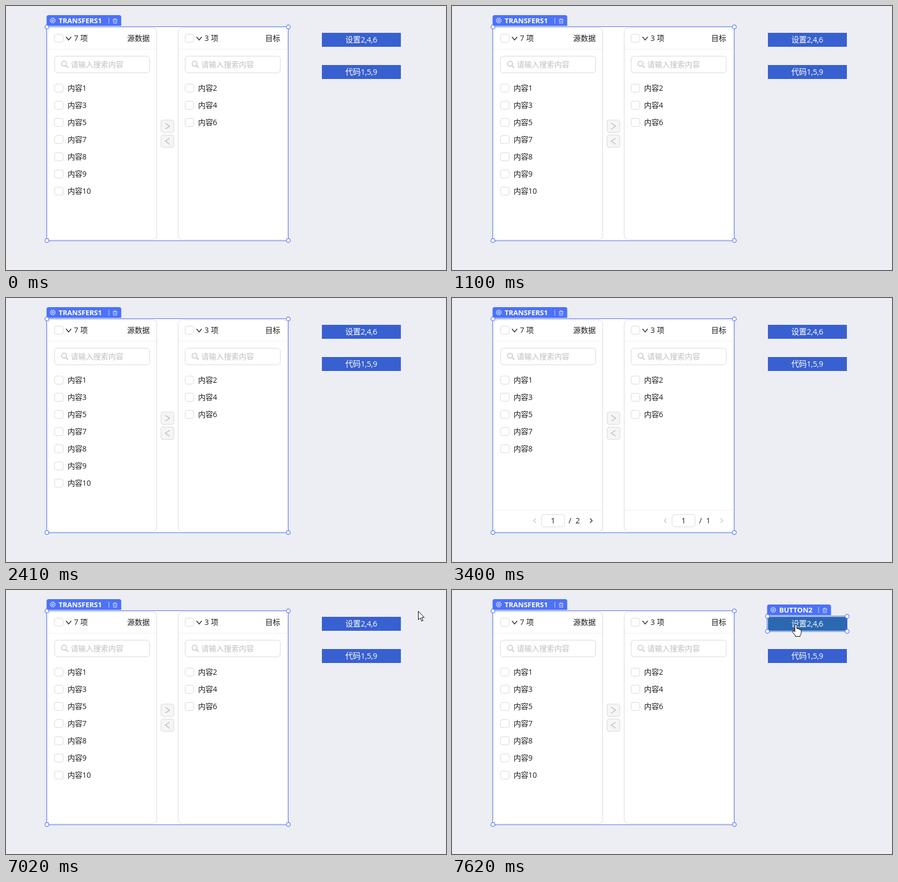
An HTML page that plays this animation: 819x492 px, repeating every 8 s.

```html
<!DOCTYPE html>
<html lang="zh">
<head>
<meta charset="utf-8">
<style>
html, body { margin: 0; width: 100%; height: 100%; overflow: hidden; background: #edeef4; }
svg { display: block; font: 14px "Open Sans", "Noto Sans CJK SC", "Noto Sans CJK", sans-serif; }
</style>
</head>
<body>
<svg id="stage" width="819" height="492" viewBox="0 0 819 492"></svg>
<script>
const stage = document.getElementById('stage');
const BLUE = '#4c72fa', BORDER = '#d9d9d9', INK = '#1f1f1f', MUTED = '#bfbfbf';
const SHIFT = 243; // distance between the two panels

const rect = (x, y, w, h, fill, stroke = 'none', r = 0) =>
  `<rect x="${x}" y="${y}" width="${w}" height="${h}" rx="${r}" fill="${fill}" stroke="${stroke}"/>`;
const line = (d, color, width = 1) =>
  `<path d="${d}" fill="none" stroke="${color}" stroke-width="${width}"/>`;
const circle = (x, y, r, fill, stroke, width = 1) =>
  `<circle cx="${x}" cy="${y}" r="${r}" fill="${fill}" stroke="${stroke}" stroke-width="${width}"/>`;
const text = (x, y, s, fill = INK, attrs = '') =>
  `<text x="${x}" y="${y}" fill="${fill}" ${attrs}>${s}</text>`;
const checkbox = (x, cy) => rect(x + .5, cy - 7.5, 16, 15, '#fff', BORDER, 3.5);

const trash = (x, y, color, scale = 1) => `<g transform="translate(${x} ${y}) scale(${scale})">` +
  line('M-5 -3H5M-2 -3V-5H2V-3M-4 -3L-3.5 5H3.5L4 -3M-1.3 -.5V3M1.3 -.5V3', color) + '</g>';

function gear(x, y) {
  let d = '';
  for (let i = 0; i <= 24; i++) {
    const a = i * Math.PI / 12, r = i % 3 ? 4.7 : 3.8;
    d += `${i ? 'L' : 'M'}${x + r * Math.cos(a)} ${y + r * Math.sin(a)}`;
  }
  return line(d + 'Z', '#fff') + circle(x, y, 1.7, 'none', '#fff');
}

// Selection outline with its name tag
function selection(x, y, w, h, name, tagWidth) {
  const top = y - 22, right = x + tagWidth;
  let s = rect(x - .5, y - .5, w, h + 1, 'none', BLUE);
  s += `<path d="M${x - .5} ${top + 20}V${top + 4}q0 -4 4 -4H${right - 3.5}q4 0 4 4V${top + 20}Z" fill="${BLUE}"/>`;
  s += gear(x + 11, top + 10) + text(x + 22, top + 14.7, name, '#fff', 'font-size="13" font-weight="700"');
  s += line(`M${right - 22.5} ${top + 5}v11`, '#a9bcfd', 1.4) + trash(right - 11, top + 11, '#e4eaff', .85);
  for (const cx of [x + .2, x + w - .5])
    for (const cy of [y, y + h]) s += circle(cx, cy, 3.7, '#fff', BLUE, 1.2);
  return s;
}

function pager(right, pages) {
  const y = 415, next = pages > 1 ? INK : MUTED;
  return line(`M${right - 193} 395.5H${right + 9}`, '#f0f0f0') +
    line(`M${right - 115} ${y - 4}l-4 4l4 4`, MUTED, 1.2) +
    rect(right - 104.5, y - 11.5, 43, 23, '#fff', BORDER, 5.5) +
    text(right - 83, y + 5, '1', INK, 'text-anchor="middle"') +
    text(right - 54, y + 5, '/') + text(right - 41, y + 5, pages) +
    line(`M${right - 14} ${y - 4}l4 4l-4 4`, next, 1.2);
}

function panel(dx, title, items, ui, removable) {
  const left = 90 + dx, back = removable ? 20 : 0;
  let s = rect(77.5 + dx, 40.5, 203, 395, '#fff', BORDER, 8);
  s += line(`M${78 + dx} 80.5h202`, '#f0f0f0');
  if (!removable) s += checkbox(left, 60);
  s += line(`M${left + 21.7 - back} 57.5l4.8 6l4.8 -6`, INK, 1.3);
  s += text(left + 36.5 - back, 65, items.length + ' 项');
  s += text(left + 177.5, 65, title, INK, 'text-anchor="end"');
  if (ui.search) {
    s += rect(left + .5, 93.5, 177, 31, '#fff', BORDER, 5.5);
    s += circle(left + 18, 107.5, 4.6, 'none', '#b5b5b5', 1.2) + line(`M${left + 21.5} 111l4.3 4.3`, '#b5b5b5', 1.3);
    s += text(left + 30.5, 114, '请输入搜索内容', MUTED);
  }
  const shown = ui.paged ? items.slice(0, 5) : items;
  shown.forEach((n, i) => {
    const cy = (ui.search ? 153 : 97) + i * 32;
    s += removable ? trash(left + 170, cy, BORDER, 1.15) : checkbox(left, cy);
    s += text(left + (removable ? 0 : 24.5), cy + 5, '内容' + n, INK, 'letter-spacing="-.2"');
  });
  if (ui.paged) s += pager(271 + dx, Math.ceil(items.length / 5));
  return s;
}

const moveButton = (y, d) => rect(288.5, y + .5, 24, 23, '#f5f5f5', BORDER, 3.5) +
  line(`M${300.5 - 4 * d} ${y + 6.5}l${8 * d} 5.5l${-8 * d} 5.5`, '#b3b3b3', 1.2);

const button = (y, label, fill) => rect(588, y, 147, 26, fill) +
  text(661.2, y + 18, label, '#fff', 'font-size="14.6" letter-spacing="-.3" text-anchor="middle"');

const ARROW = 'M.5 .5V16.5L4.2 13L6.7 19L9.2 18L6.7 12.2H11.5Z';
const HAND = 'M-1.8 14V2Q-1.8 .4 0 .4T1.8 2V8Q4.6 7 5 9Q7.4 8 7.8 10Q10 9.3 10 11.5V16' +
  'Q10 19 8 20.5V22.5H-1V20.5L-6 14.5Q-6.5 11.8 -3.8 12.3Z';

function draw(ui) {
  const hover = ui.pointer && ui.pointer.x < 734 && ui.pointer.y > 50;
  let s = rect(0, 0, 819, 492, '#edeef4') + rect(76, 39, 450, 398, '#fff');
  s += panel(0, '源数据', [1, 3, 5, 7, 8, 9, 10], ui, false);
  s += panel(SHIFT, '目标', [2, 4, 6], ui, ui.oneWay);
  s += ui.oneWay ? moveButton(226, 1) : moveButton(212, 1) + moveButton(240, -1);
  s += selection(76, 39, 450, 398, 'TRANSFERS1', 138);
  s += button(50, '设置2,4,6', hover ? '#2c68b0' : '#3860d0') + button(110, '代码1,5,9', '#3860d0');
  if (hover) s += selection(587, 49, 149, 28, 'BUTTON2', 118);
  if (ui.pointer) s += `<path transform="translate(${ui.pointer.x} ${ui.pointer.y})" ` +
    `d="${hover ? HAND : ARROW}" fill="#fff" stroke="#000" stroke-linejoin="round"/>`;
  stage.innerHTML = s;
}

function pointerAt(t) {
  if (t < 7020) return null;
  const left = 1 - Math.min(6, Math.floor((t - 7020) / 100)) / 6;
  const p = 1 - left ** 1.5;
  return { x: Math.round(767 - 127 * p), y: Math.round(39 + 25 * p) };
}

let last = '';
function tick() {
  const t = performance.now() % 8000;
  const within = (a, b) => t >= a && t < b;
  const ui = {
    search: !within(500, 1100),
    oneWay: within(1700, 2410),
    paged: within(3400, 4400),
    pointer: pointerAt(t)
  };
  const key = JSON.stringify(ui);
  if (key !== last) draw(ui);
  last = key;
  requestAnimationFrame(tick);
}
tick();
</script>
</body>
</html>
```
